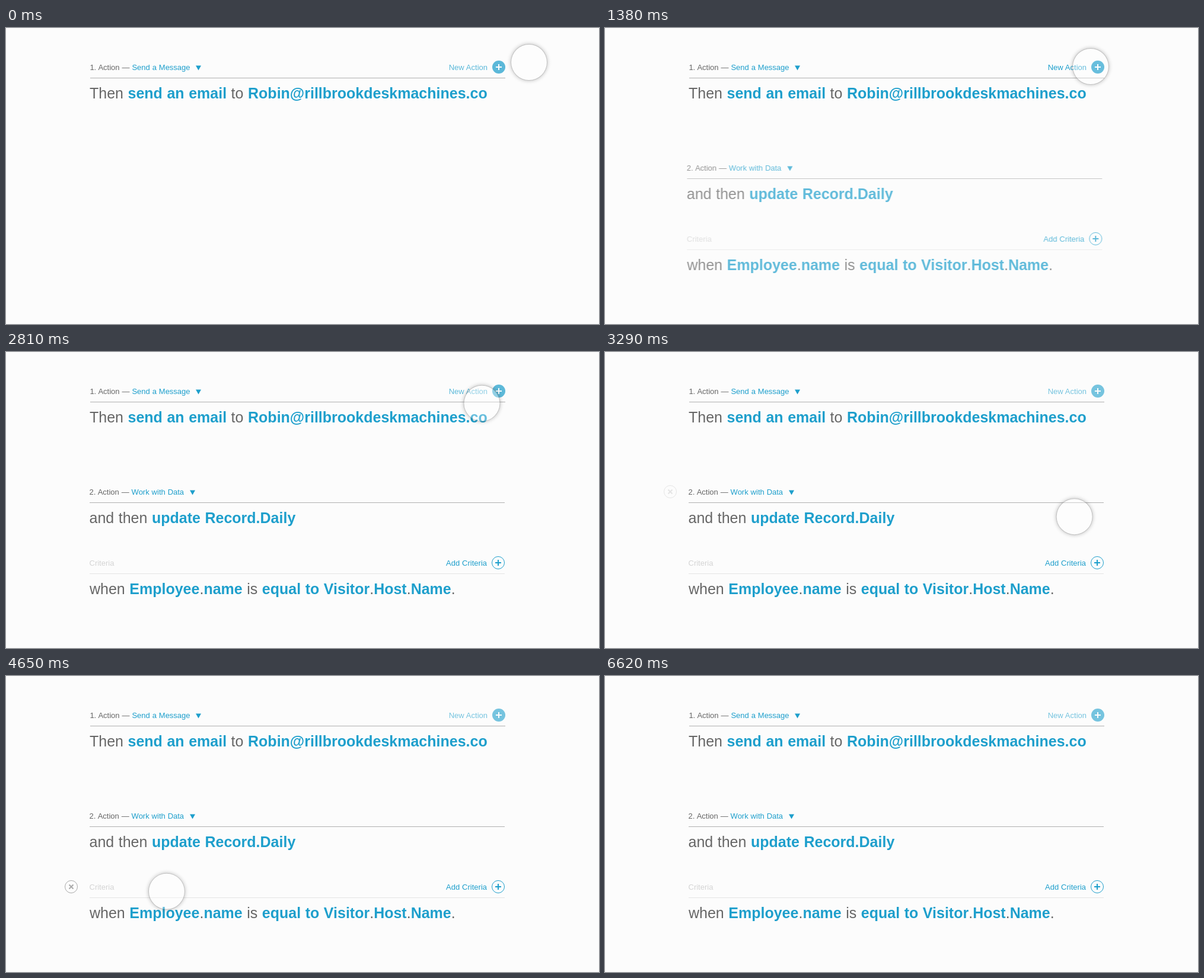
Animation, 1000 px wide and 500 px high, one loop 6.69 s. Source, as an HTML page:

```html
<!DOCTYPE html>
<html lang="en">
<head>
<meta charset="utf-8">
<title>Action builder</title>
<style>
  html, body { margin: 0; width: 100%; height: 100%; overflow: hidden; background: #fcfcfc; }
  #stage { position: relative; width: 1000px; height: 500px; overflow: hidden; }
  svg { position: absolute; inset: 0; }
  text { font: 13px "Liberation Sans", Arial, sans-serif; fill: #666; word-spacing: .3px; }
  .big { font-size: 25px; word-spacing: .6px; }
  b, .bold { font-weight: bold; }
  .blue { fill: #1e9fcc; }
  .pale { fill: #d4d4d4; }
  .end { text-anchor: end; }
  .rule { stroke: #b0b0b0; }
  .soft { stroke: #e4e4e4; }
  .ring { fill: none; stroke: #1e9fcc; }
  .plus { stroke-width: 2; }
  .remove { fill: none; stroke: #aaa; }
  #cursor {
    position: absolute; left: -31px; top: -31px; width: 62px; height: 62px;
    box-sizing: border-box; border-radius: 50%;
    border: 1px solid rgba(0, 0, 0, .24);
    background: rgba(253, 253, 253, .33);
    box-shadow: 0 0 6px rgba(0, 0, 0, .25);
  }
</style>
</head>
<body>
<div id="stage">
  <svg width="1000" height="500" viewBox="0 0 1000 500">
    <defs>
      <path id="arrow" class="blue" d="M0 0h9l-4.5 8z"/>
      <path id="plus" class="plus" d="M-5 0h10M0-5v10"/>
      <g id="cross">
        <circle r="10.5"/>
        <path d="M-3.500-3.500l7 7m0-7l-7 7" stroke-width="2"/>
      </g>
    </defs>

    <text x="141.4" y="71">1. Action — <tspan class="blue">Send a Message</tspan></text>
    <use href="#arrow" x="320" y="63.500"/>
    <g id="newAction">
      <text class="blue end" x="812" y="71">New Action</text>
      <circle class="blue" cx="831" cy="66" r="11"/>
      <use href="#plus" x="831" y="66" stroke="#fff"/>
    </g>
    <path class="rule" d="M142 84.5H842"/>
    <text class="big" x="141" y="119">Then <tspan class="bold blue">send an email</tspan> to <tspan class="bold blue">Robin@rillbrookdeskmachines.co</tspan></text>

    <g id="added">
      <text x="140.6" y="241">2. Action — <tspan class="blue">Work with Data</tspan></text>
      <use href="#arrow" x="310" y="233.500"/>
      <path class="rule" d="M141 254.5H841"/>
      <text class="big" x="140.500" y="289">and then <tspan class="bold blue">update Record.Daily</tspan></text>

      <text class="pale" x="140.500" y="361">Criteria</text>
      <text class="blue end" x="811" y="361">Add Criteria</text>
      <circle class="ring" cx="830" cy="356" r="10.500"/>
      <use href="#plus" x="830" y="356" stroke="#1e9fcc"/>
      <path class="soft" d="M141 374.5H841"/>
      <text class="big" x="141" y="409">when <tspan class="bold blue">Employee</tspan>.<tspan class="bold blue">name</tspan> is <tspan class="bold blue">equal to Visitor</tspan>.<tspan class="bold blue">Host</tspan>.<tspan class="bold blue">Name</tspan>.</text>
    </g>

    <use id="removeAction" class="remove" href="#cross" x="110" y="236"/>
    <use id="removeCriteria" class="remove" href="#cross" x="110" y="356"/>
  </svg>
  <div id="cursor"></div>
</div>
<script>
const LOOP = 6690;
const $ = id => document.getElementById(id);

// Each cursor move runs along one cubic Bézier curve.
const moves = [
  { from: 30, to: 630, x: [882, 925, 905, 819], y: [58, 60, 72, 65] },
  { from: 2605, to: 3475, x: [819, 760, 790, 793], y: [65, 120, 275, 284] },
  { from: 3690, to: 5100, x: [793, 394, 254, 251], y: [284, 285, 551, 237] },
  { from: 5290, to: 5730, x: [251, 300, 480, 1050], y: [237, 240, 70, 330] }
];

const progress = (t, from, to) => Math.min(1, Math.max(0, (t - from) / (to - from)));
const easeInOut = p => p < .5 ? 2 * p * p : 1 - 2 * (1 - p) ** 2;
const easeOut = p => 1 - (1 - p) ** 4;
const bezier = ([a, b, c, d], u, v = 1 - u) =>
  v * v * v * a + 3 * v * v * u * b + 3 * v * u * u * c + u * u * u * d;

function draw(t) {
  const ramp = (from, to) => easeInOut(progress(t, from, to));
  const fade = (id, opacity) => { $(id).style.opacity = opacity; };

  const move = moves.findLast(m => t >= m.from) || moves[0];
  const u = ramp(move.from, move.to);
  $('cursor').style.transform = `translate(${bezier(move.x, u)}px, ${bezier(move.y, u)}px)`;

  fade('newAction', .72 + .28 * ramp(350, 560) - .4 * ramp(2660, 2900));
  fade('removeAction', .28 * (ramp(2960, 3200) - ramp(4375, 4580)) + ramp(4840, 5090) - ramp(5290, 5660));
  fade('removeCriteria', ramp(4270, 4560) - ramp(4800, 5040));

  const shown = easeOut(progress(t, 1210, 1860));
  fade('added', shown);
  $('added').setAttribute('transform', `translate(${9 * (shown - 1)} 0)`);
}

let start;
function tick(now) {
  start ??= now;
  draw((now - start) % LOOP);
  requestAnimationFrame(tick);
}
draw(0);
requestAnimationFrame(tick);
</script>
</body>
</html>
```
